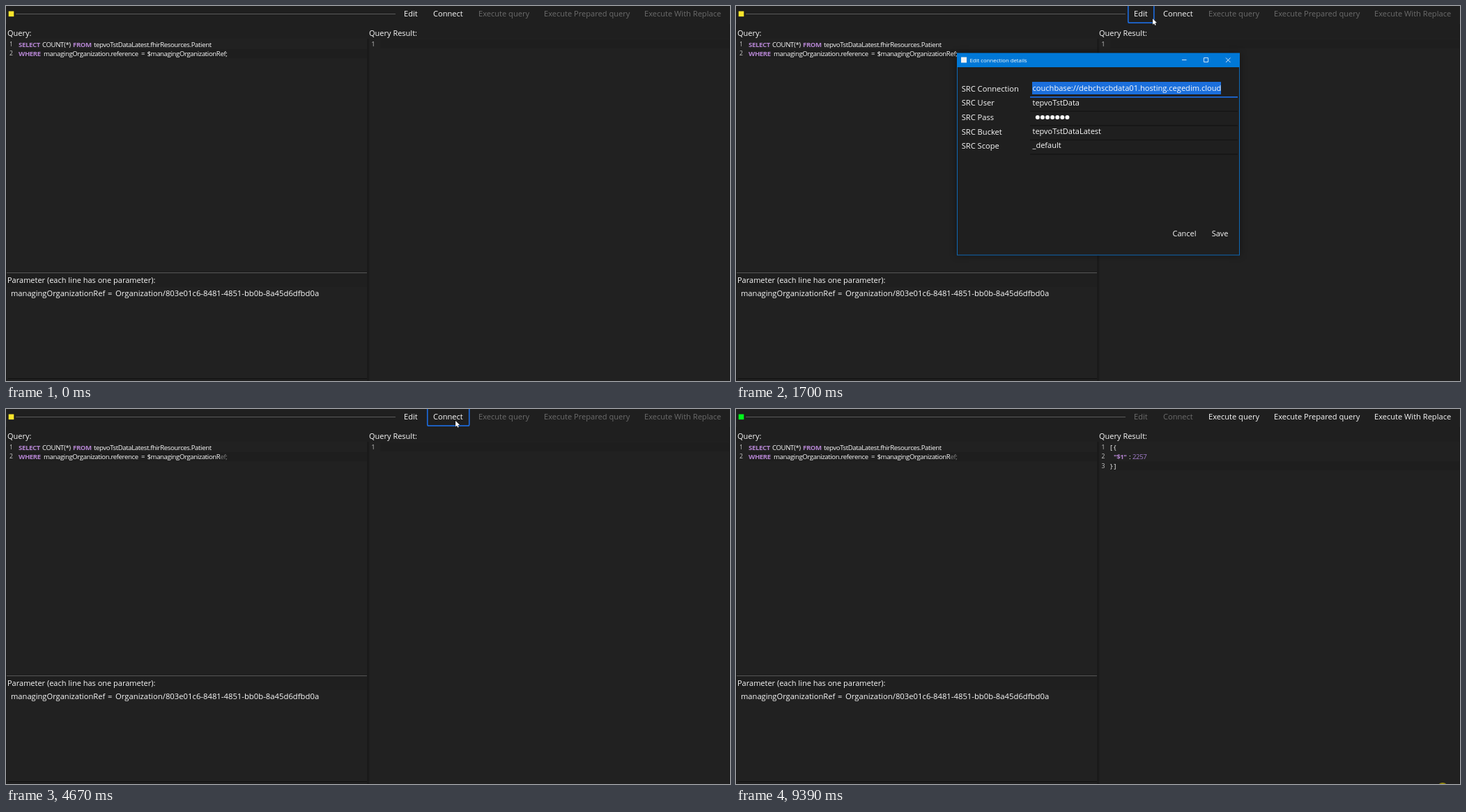
Recreate the animation shown at these times as an HTML page with a canvas. Size 1039 by 539 pixels, loop 9590 ms.

```html
<!DOCTYPE html>
<html lang="en">
<head>
<meta charset="utf-8">
<title>Query tool</title>
<style>
  html, body { margin: 0; width: 100%; height: 100%; overflow: hidden; background: #1f1f1f; }
  canvas { display: block; }
</style>
</head>
<body>
<canvas id="stage" width="1039" height="539"></canvas>
<script>
const ctx = document.getElementById('stage').getContext('2d');
const LOOP = 9590;
const BLUE = '#0078d7', FOCUS = '#1d68d6', PURPLE = '#b585d2', LIGHT = '#fafafa', DIM = '#6c6c6c';

// Pointer path: time, x, y. Gaps between tracks are times off stage.
const TRACKS = [
  [[260, 908, 387], [400, 790, 230], [690, 592, 13], [1560, 592, 13], [1700, 598, 18],
   [2310, 640, 120], [2450, 699, 80], [3000, 699, 80], [3540, 639, 14], [4080, 639, 14],
   [4670, 645, 17], [5100, 690, 40], [5570, 785, 33], [5920, 835, 16], [8000, 835, 16], [8170, 988, 235]],
  [[8370, 1031, 481], [8930, 1014, 545]]
];
const CLICKS = [[1160, 1360, 592, 12.5], [2650, 2850, 699, 80], [3810, 4080, 639, 14],
                [6380, 6580, 835, 15], [9390, LOOP, 1014, 545]];
// Label, x, frame width, frame on, frame off, enabled before connecting
const MENU = [
  ['Edit', 571, 37, 690, 3810, true],
  ['Connect', 613, 60, 4670, 5150, true],
  ['Execute query', 678, 90, 5200, 6380, false],
  ['Execute Prepared query', 772, 139, 5710, 9390, false],
  ['Execute With Replace', 916, 128, LOOP, LOOP, false]
];
const CONNECTED = 5150, RESULT = 6910;

const between = (t, a, b) => t >= a && t < b;
const clamp = v => Math.max(0, Math.min(1, v));

function rect(x, y, w, h, color) {
  ctx.fillStyle = color;
  ctx.fillRect(x, y, w, h);
}

function text(str, x, y, size = 11, color = LIGHT, weight = 400) {
  ctx.font = `${weight} ${size}px "Open Sans", "Noto Sans", sans-serif`;
  ctx.fillStyle = color;
  ctx.fillText(str, x, y);
}

// Editor text is set tightly.
function code(str, x, y, color = LIGHT, weight = 400) {
  ctx.letterSpacing = '-0.38px';
  text(str, x, y, 9.6, color, weight);
  ctx.letterSpacing = '0px';
}
const keyword = (str, x, y) => code(str, x, y, PURPLE, 700);
const lineNumber = (n, x, y) => text(n, x, y, 8.6, '#ccc');

function dot(x, y, r, color) {
  ctx.fillStyle = color;
  ctx.beginPath();
  ctx.arc(x, y, r, 0, 7);
  ctx.fill();
}

function drawMenu(t) {
  const connected = t >= CONNECTED;
  rect(3.7, 7.5, 7.6, 7.6, connected ? '#00f81c' : '#fbe52b');
  rect(14, 11, 545, 1, '#5a5a5a');
  for (const [label, x, width, on, off, early] of MENU) {
    text(label, x, 15, 11.1, early !== connected ? LIGHT : DIM);
    if (!between(t, on, off)) continue;
    ctx.strokeStyle = FOCUS;
    ctx.lineWidth = 1.7;
    ctx.beginPath();
    ctx.roundRect(x - 8.2, -5, width, 29.2, 2);
    ctx.stroke();
  }
}

function drawPanes(t) {
  rect(0, 0, 1039, 539, '#1f1f1f');
  rect(1, 47, 517, 334, '#212121');
  rect(1, 404, 517, 131, '#212121');
  rect(522, 47, 516, 492, '#212121');
  rect(0, 26, 1, 513, '#181818');
  rect(518, 47, 3, 492, '#1a1a1a');
  rect(1, 383, 517, 1, '#565656');
  rect(3, 535, 515, 1, '#111');
  rect(1038, 26, 1, 513, '#181818');

  text('Query:', 2, 43);
  text('Query Result:', 521, 43);
  text('Parameter (each line has one parameter):', 2, 398);

  rect(18, 62, 500, 13, '#1e1e1e');
  lineNumber('1', 5, 58);
  lineNumber('2', 5, 71);
  keyword('SELECT', 18, 59);
  code('COUNT(*)', 52, 59);
  keyword('FROM', 96, 59);
  code('tepvoTstDataLatest.fhirResources.Patient', 126, 59);
  keyword('WHERE', 18, 72);
  code('managingOrganization.reference', 54, 72);
  code('=', 194, 72);
  code('$managingOrganizationRef;', 202.5, 72);
  if (t > 2950) rect(308, 63, 13, 12, 'rgba(30,30,30,.55)');

  text('managingOrganizationRef', 7, 417, 11.15);
  text('=', 146, 417, 11.15);
  text('Organization/803e01c6-8481-4851-bb0b-8a45d6dfbd0a', 157, 417, 11.3);

  const done = t >= RESULT;
  rect(537, done ? 75 : 48, 501, 13, '#1e1e1e');
  lineNumber('1', 524.5, 58);
  if (!done) return;
  lineNumber('2', 524.5, 71);
  lineNumber('3', 524.5, 84.5);
  code('[ {', 537, 58.5);
  keyword('"$1"', 542, 72);
  code(':', 564, 72);
  code('2257', 569, 72, '#a67fd0');
  code('} ]', 537, 85.5);
}

function drawDialog(t) {
  if (!between(t, 1430, 3080)) return;
  const opening = 1 - (1 - clamp((t - 1440) / 250)) ** 2;
  const shown = t < 2850 ? opening : 1 - clamp((t - 2850) / 230);
  const scale = 0.945 + 0.055 * shown;
  ctx.save();
  ctx.globalAlpha = shown;
  ctx.translate(520, 213);
  ctx.scale(scale, scale);
  ctx.translate(-520, -213);

  ctx.shadowColor = 'rgba(0,0,0,.4)';
  ctx.shadowBlur = 10;
  rect(317, 68, 406, 290, '#1f1f1f');
  ctx.shadowColor = 'transparent';
  ctx.strokeStyle = '#0f69b5';
  ctx.lineWidth = 1;
  ctx.strokeRect(317.5, 68.5, 405, 289.5);
  rect(317, 67.5, 406, 20.5, t < 2850 ? BLUE : '#0d80dc');
  rect(323, 73.5, 8, 8, '#f0f0f0');
  text('Edit connection details', 335.5, 80.5, 7.8);

  if (t < 2850) {
    if (t >= 2450) rect(690, 68, 33, 20, t < 2650 ? '#e81123' : '#f1707a');
    ctx.strokeStyle = '#e8f2fa';
    ctx.lineWidth = 0.9;
    ctx.beginPath();
    ctx.moveTo(640, 77.5); ctx.lineTo(646.5, 77.5);
    ctx.rect(671.5, 74.5, 6, 6);
    ctx.moveTo(703, 74.5); ctx.lineTo(709.5, 81);
    ctx.moveTo(709.5, 74.5); ctx.lineTo(703, 81);
    ctx.stroke();
  }

  ['Connection', 'User', 'Pass', 'Bucket', 'Scope'].forEach((name, i) => {
    text('SRC ' + name, 323.7, 122.7 + i * 20.6, 11.15);
    rect(422, 130 + i * 20.6, 298, i ? 1.4 : 1.8, i ? '#141414' : FOCUS);
  });
  rect(425, 109, 271, 18, '#1b6fdc');
  text('couchbase://debchscbdata01.hosting.cegedim.cloud', 425.5, 121.7, 11.1);
  text('tepvoTstData', 425.5, 142.5, 11);
  for (let i = 0; i < 7; i++) dot(432.8 + i * 7.1, 160, 3, LIGHT);
  text('tepvoTstDataLatest', 425.5, 184, 11);
  text('_default', 425.5, 204, 11);
  text('Cancel', 626.5, 331, 11);
  text('Save', 682.7, 331, 11);
  ctx.restore();
}

function pointerAt(t) {
  const track = TRACKS.find(k => between(t, k[0][0], k.at(-1)[0]));
  if (!track) return null;
  const i = track.findIndex(k => k[0] > t);
  const [t0, x0, y0] = track[i - 1], [t1, x1, y1] = track[i];
  const p = (t - t0) / (t1 - t0);
  return [x0 + (x1 - x0) * p, y0 + (y1 - y0) * p];
}

function drawPointer(t) {
  for (const [on, off, x, y] of CLICKS)
    if (between(t, on, off)) dot(x, y, 8, 'rgba(240,220,0,.55)');
  const at = pointerAt(t);
  if (!at) return;
  ctx.save();
  ctx.translate(...at);
  ctx.beginPath();
  if (between(t, 2200, 2400) || between(t, 2850, 3000)) {
    ctx.strokeStyle = '#9fb4c8';
    ctx.lineWidth = 0.8;
    ctx.moveTo(-1.5, -4); ctx.lineTo(1.5, -4);
    ctx.moveTo(0, -4); ctx.lineTo(0, 5);
    ctx.moveTo(-1.5, 5); ctx.lineTo(1.5, 5);
    ctx.stroke();
  } else {
    [[0, 0], [0, 8.5], [2, 6.8], [3.3, 9.6], [4.6, 9], [3.4, 6.2], [6, 6]].forEach(p => ctx.lineTo(...p));
    ctx.closePath();
    ctx.strokeStyle = '#111';
    ctx.lineWidth = 0.8;
    ctx.stroke();
    ctx.fillStyle = '#fff';
    ctx.fill();
  }
  ctx.restore();
}

const start = performance.now();
function frame() {
  const t = (performance.now() - start) % LOOP;
  drawPanes(t);
  drawMenu(t);
  drawDialog(t);
  drawPointer(t);
  requestAnimationFrame(frame);
}
frame();
</script>
</body>
</html>
```
